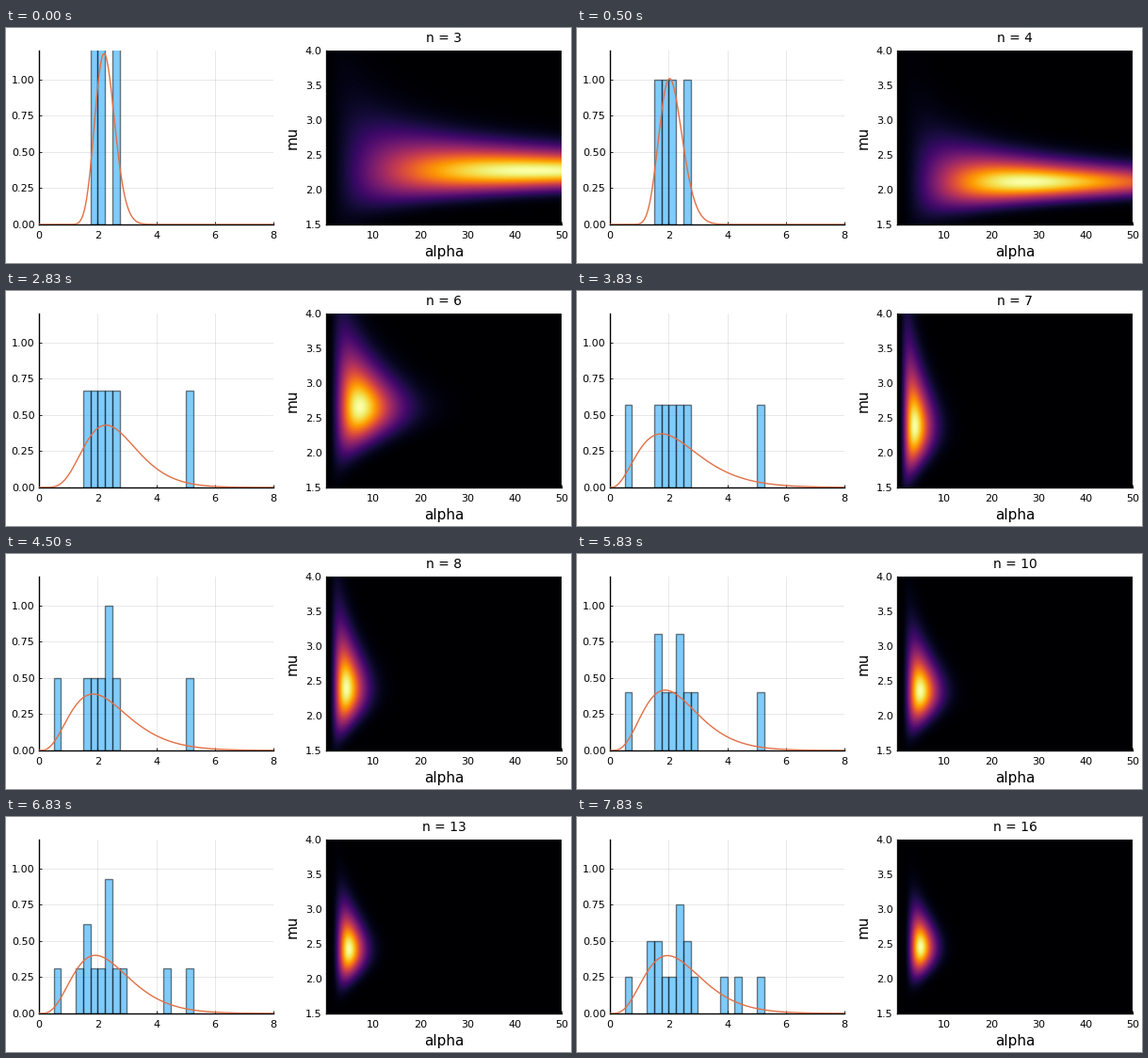
A matplotlib script for the animation above (8 s loop, 600x250 px).

```python
import math

import matplotlib.pyplot as plt
import numpy as np
from matplotlib.animation import FuncAnimation

W, H, DPI = 600, 250, 100
LOOP, STEP = 8000, 20
TOP, BOTTOM = 23.7, 209

SAMPLES = np.array([1.92, 2.14, 2.745, 1.626, 2.469, 5.01, 0.728, 2.482,
                    1.57, 2.81, 2.30, 1.40, 4.26, 1.34, 2.56, 3.84])
FIRST = 3
ARRIVALS = [500, 1830, 2830, 3830, 4500, 5170, 5830,
            6170, 6500, 6830, 7170, 7500, 7830]

BIN = 0.25
EDGES = np.arange(0, 8 + BIN, BIN)
XS = np.linspace(1e-6, 8, 401)
ALPHAS = np.linspace(0.1, 50, 500)
MUS = np.linspace(1.5, 4, 251)
LGAMMA = np.array([math.lgamma(a) for a in ALPHAS])

plt.rcParams["font.family"] = "DejaVu Sans"
fig = plt.figure(figsize=(W / DPI, H / DPI), dpi=DPI, facecolor="white")


def panel(left, right, xlim, ylim, xticks, yticks):
    ax = fig.add_axes([left / W, 1 - BOTTOM / H,
                       (right - left) / W, (BOTTOM - TOP) / H])
    ax.set(xlim=xlim, ylim=ylim, xticks=xticks, yticks=yticks)
    ax.spines[["top", "right"]].set_visible(False)
    ax.spines[["left", "bottom"]].set_linewidth(1)
    ax.tick_params(direction="in", length=2, width=0.6,
                   labelleft=False, labelbottom=False)
    ax.set_axisbelow(True)
    return ax


def put(x, y, text, size=8, **kw):
    """Text at stage pixels, y being the baseline."""
    return fig.text(x / W, 1 - y / H, text, fontsize=size,
                    va="baseline", **kw)


def tick_labels(ax, left, right, xfmt, yfmt):
    (x0, x1), (y0, y1) = ax.get_xlim(), ax.get_ylim()
    for v in ax.get_xticks():
        x = left + (v - x0) / (x1 - x0) * (right - left)
        put(x, 224, format(v, xfmt), ha="center")
    for v in ax.get_yticks():
        y = BOTTOM - (v - y0) / (y1 - y0) * (BOTTOM - TOP)
        put(left - 4.5, y + 4, format(v, yfmt), ha="right")


def likelihood(data):
    """Gamma likelihood over (mu, alpha), scaled to a peak of one."""
    n, total, logs = len(data), data.sum(), np.log(data).sum()
    a, m = ALPHAS[None, :], MUS[:, None]
    ll = (n * (a * np.log(a / m) - LGAMMA[None, :])
          + (a - 1) * logs - a * total / m)
    return np.exp(ll - ll.max())


def gamma_pdf(x, a, mu):
    rate = a / mu
    return np.exp(a * math.log(rate) - math.lgamma(a)
                  + (a - 1) * np.log(x) - rate * x)


def build(n):
    data = SAMPLES[:n]
    like = likelihood(data)
    row, col = np.unravel_index(like.argmax(), like.shape)
    heights = np.histogram(data, EDGES)[0] / (n * BIN)
    return n, heights, gamma_pdf(XS, ALPHAS[col], MUS[row]), like


STATES = [build(n) for n in range(FIRST, len(SAMPLES) + 1)]

hist = panel(35, 284.3, (0, 8), (0, 1.2),
             [0, 2, 4, 6, 8], [0, 0.25, 0.5, 0.75, 1])
hist.grid(color="black", alpha=0.1, linewidth=0.6)
tick_labels(hist, 35, 284.3, ".0f", ".2f")
bars = hist.bar(EDGES[:-1], np.zeros(len(EDGES) - 1), BIN, align="edge",
                color="#009afa", edgecolor="black", linewidth=1, alpha=0.5)
curve, = hist.plot(XS, 0 * XS, color="#e26f46", linewidth=1, zorder=3)

heat = panel(340, 590, (0, 50), (1.5, 4),
             [10, 20, 30, 40, 50], [1.5, 2, 2.5, 3, 3.5, 4])
tick_labels(heat, 340, 590, ".0f", ".1f")
image = heat.imshow(STATES[0][3], cmap="inferno", vmin=0, vmax=1,
                    origin="lower", extent=(0, 50, 1.5, 4),
                    aspect="auto", interpolation="bilinear")
put(465, 243, "alpha", 11, ha="center")
put(309, 117, "mu", 11, ha="center", rotation=90, rotation_mode="anchor")
title = put(465, 15, "", 10, ha="center")


def draw(i):
    now = (i + 1) * STEP - 1
    n, heights, pdf, like = STATES[sum(t <= now for t in ARRIVALS)]
    for bar, h in zip(bars, heights):
        bar.set_height(h)
        bar.set_visible(h > 0)
    curve.set_ydata(pdf)
    image.set_data(like)
    title.set_text(f"n = {n}")
    return [*bars, curve, image, title]


anim = FuncAnimation(fig, draw, frames=LOOP // STEP, interval=STEP,
                     repeat=True, repeat_delay=0)
plt.show()
```
